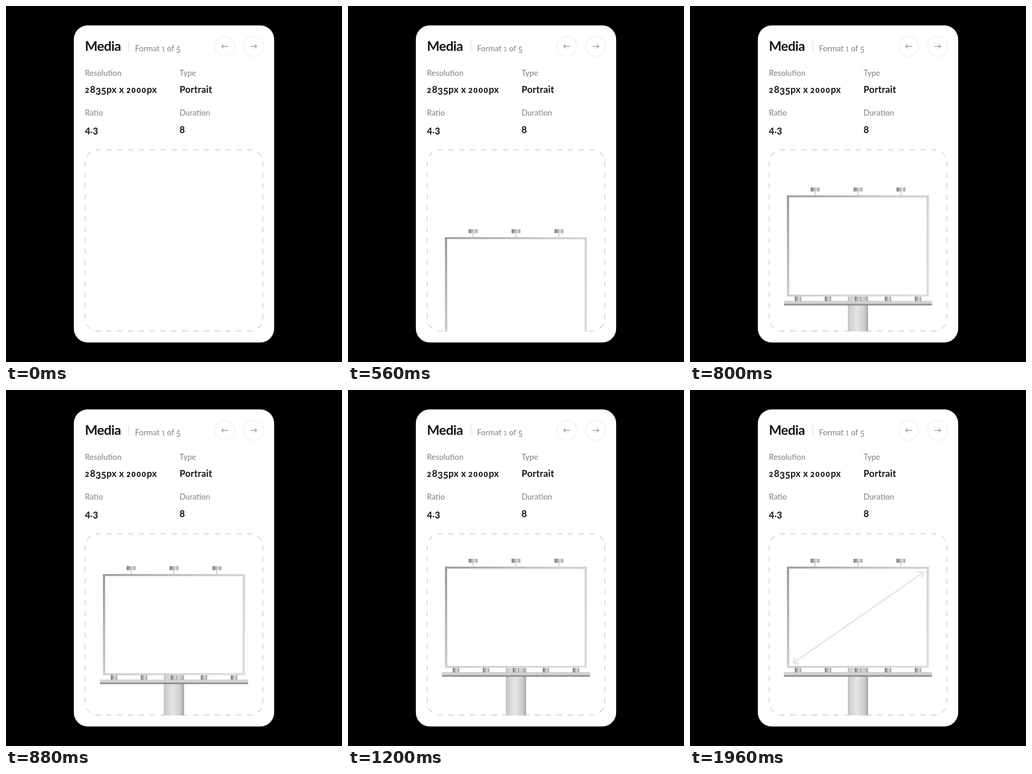
An HTML page that plays this animation: 728x770 px, repeating every 2040 ms.

```html
<!DOCTYPE html>
<html lang="en">
<head>
<meta charset="utf-8">
<title>Media format</title>
<style>
  html, body { margin: 0; width: 100%; height: 100%; overflow: hidden; background: #000; }
  svg { display: block; width: 728px; height: 770px; font-family: Lato, "Open Sans", sans-serif; }

  .title { font-size: 29px; font-weight: 700; letter-spacing: -.6px; fill: #161616; }
  .label { font-size: 17px; fill: #808080; }
  .value { font-size: 20px; font-weight: 700; letter-spacing: .3px; fill: #161616; }
  .low { font-size: .78em; }
  .value .low { font-weight: 900; letter-spacing: 2px; }

  .nav { fill: none; stroke: #808080; stroke-width: 1.2; }
  .nav circle { stroke: #ededed; stroke-width: 1.5; }
  .drop { fill: none; stroke: #c4c4c4; stroke-width: 1.3; stroke-dasharray: .5; stroke-dashoffset: .25; }

  .board { animation: rise 2040ms infinite; }
  .size { fill: none; stroke: #dfdfdf; stroke-width: 2.5; stroke-linecap: round; stroke-linejoin: round; }
  .size path { stroke-dasharray: 1 2; animation: 2040ms linear infinite; }
  .size .shaft { animation-name: shaft; }
  .size .tip { animation-name: tip; }

  @keyframes rise {
    0% { transform: translateY(352px); animation-timing-function: cubic-bezier(.65, 0, .12, 1); }
    59.61%, 100% { transform: none; }
  }
  @keyframes shaft {
    0%, 68.62% { stroke-dashoffset: 1; opacity: 0; }
    68.63% { stroke-dashoffset: 1; opacity: 1; animation-timing-function: cubic-bezier(.65, 0, .12, 1); }
    92.16%, 100% { stroke-dashoffset: 0; opacity: 1; }
  }
  @keyframes tip {
    0%, 83.32% { stroke-dashoffset: 1; opacity: 0; }
    83.33% { stroke-dashoffset: 1; opacity: 1; animation-timing-function: cubic-bezier(.4, 0, .2, 1); }
    96.08%, 100% { stroke-dashoffset: 0; opacity: 1; }
  }
</style>
</head>
<body>
<svg viewBox="0 0 728 770">
  <defs>
    <linearGradient id="frame" x2="1" y2=".75">
      <stop stop-color="#999"/>
      <stop offset=".5" stop-color="#d2d2d2"/>
      <stop offset="1" stop-color="#e4e4e4"/>
    </linearGradient>
    <linearGradient id="metal">
      <stop stop-color="#777"/>
      <stop offset=".65" stop-color="#dcdcdc"/>
      <stop offset="1" stop-color="#9c9c9c"/>
    </linearGradient>
    <linearGradient id="pole">
      <stop stop-color="#bcbcbc"/>
      <stop offset=".1" stop-color="#d0d0d0"/>
      <stop offset=".45" stop-color="#e5e5e5"/>
      <stop offset=".8" stop-color="#cecece"/>
      <stop offset="1" stop-color="#a9a9a9"/>
    </linearGradient>
    <linearGradient id="rail" x2="0" y2="1">
      <stop stop-color="#bdbdbd"/>
      <stop offset=".35" stop-color="#dedede"/>
      <stop offset=".65" stop-color="#b8b8b8"/>
      <stop offset="1" stop-color="#696969"/>
    </linearGradient>
    <clipPath id="window"><path d="M171 311H557V704H171Z"/></clipPath>
    <g id="lamp">
      <rect x="-.75" y="373" width="1.5" height="10" fill="#bbb"/>
      <rect x="-9.5" y="365" width="19" height="8.7" fill="url(#metal)"/>
    </g>
    <rect id="foot" x="-7" y="600" width="14" height="11" fill="url(#metal)"/>
  </defs>

  <rect x="147" y="42" width="434" height="685.7" rx="30" fill="#fff"/>

  <text class="title" x="171" y="97">Media</text>
  <path d="M266.3 75V100" stroke="#dcdcdc" stroke-width="1.4"/>
  <text class="label" x="279.5" y="97.5">Format <tspan class="low">1</tspan> of <tspan dy=".19em">5</tspan></text>

  <g class="nav">
    <circle cx="474" cy="87.3" r="21.5"/>
    <path d="M481 87.3H467.5M471.5 83.3L467.5 87.3L471.5 91.3"/>
    <circle cx="536.5" cy="87.3" r="21.5"/>
    <path d="M530 87.3H543M539 83.3L543 87.3L539 91.3"/>
  </g>

  <text class="label" x="171" y="150.5">Resolution</text>
  <text class="value" x="171" y="188"><tspan class="low">2</tspan>8<tspan dy=".19em">35</tspan><tspan dy="-.19em">px x </tspan><tspan class="low">2000</tspan>px</text>
  <text class="label" x="376" y="150.5">Type</text>
  <text class="value" x="376" y="188">Portrait</text>
  <text class="label" x="171" y="237">Ratio</text>
  <text class="value" x="171" y="274.5"><tspan dy=".19em">4</tspan><tspan dy="-.19em">.</tspan><tspan dy=".19em">3</tspan></text>
  <text class="label" x="376" y="237">Duration</text>
  <text class="value" x="376" y="274.5">8</text>

  <rect class="drop" x="171.5" y="311" width="385" height="392" rx="28" pathLength="64"/>

  <g clip-path="url(#window)">
    <g class="board">
      <use href="#lamp" x="271"/>
      <use href="#lamp" x="364"/>
      <use href="#lamp" x="457"/>
      <rect x="342" y="600" width="44" height="110" fill="url(#pole)"/>
      <use href="#foot" x="234"/>
      <use href="#foot" x="299"/>
      <use href="#foot" x="364"/>
      <use href="#foot" x="429"/>
      <use href="#foot" x="494"/>
      <rect x="203.5" y="610.5" width="321" height="9.5" fill="url(#rail)"/>
      <rect x="210" y="382" width="308" height="219" fill="url(#frame)"/>
      <rect x="214.5" y="386" width="299" height="211.5" fill="#fff" stroke="#b9b9b9" stroke-width=".9"/>
    </g>
  </g>

  <g class="size">
    <path class="shaft" pathLength="1" d="M224 590.3L505.3 394.8"/>
    <path class="tip" pathLength="1" d="M505.3 394.8L494.4 392.8"/>
    <path class="tip" pathLength="1" d="M505.3 394.8L502.8 405.8"/>
    <path class="tip" pathLength="1" d="M224 590.3L226.5 579.3"/>
    <path class="tip" pathLength="1" d="M224 590.3L234.9 592"/>
  </g>
</svg>
</body>
</html>
```
